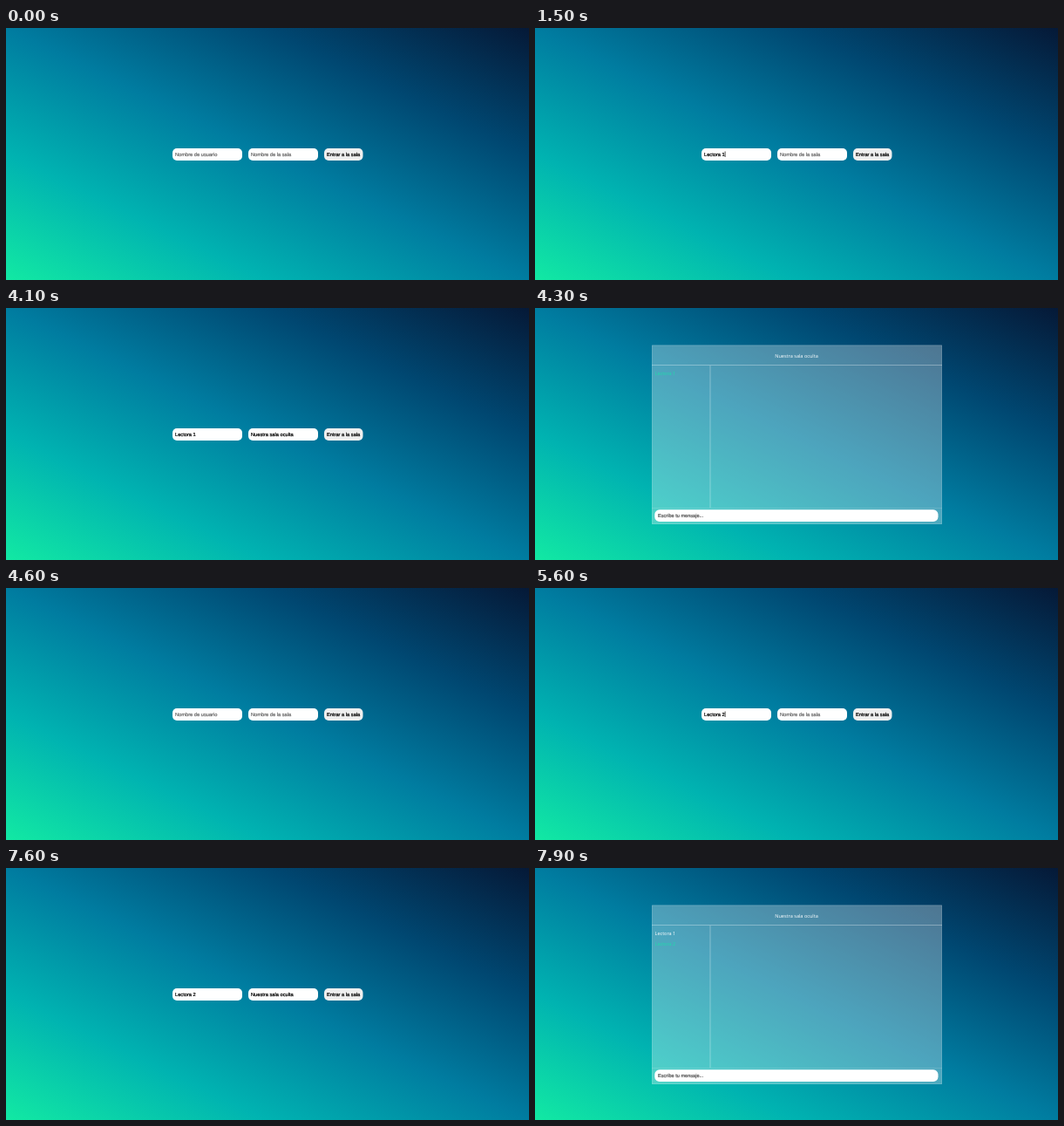
These frames come from a looping animation (600 px wide and 289 px high, 8000 ms). An HTML page:

```html
<!DOCTYPE html>
<html lang="es">
<head>
<meta charset="utf-8">
<title>Sala de chat</title>
<style>
  html, body { margin: 0; height: 100%; overflow: hidden; }
  body { background: linear-gradient(to left bottom, #051937, #004771, #007ca0, #00b3b1, #12e9a3); }
  svg { display: block; width: 100vw; height: 100vh; }
  text { white-space: pre; text-rendering: geometricPrecision; }
  #form text, #chat #message { font: 5.7px "Liberation Sans", Arial, sans-serif; stroke: currentColor; stroke-width: .22px; fill: currentColor; }
  #chat text { font: 5.55px "Open Sans", sans-serif; fill: #fff; }
  #chat #message { font-size: 5.6px; color: #555; }
  #chat .self { fill: #1fdcab; }
  .line { fill: none; stroke: #fff; stroke-opacity: .32; }
  .faint { stroke-opacity: .12; }
</style>
</head>
<body>
<svg viewBox="0 0 600 289" preserveAspectRatio="none">
  <g id="form">
    <rect x="191" y="138" width="80" height="14" rx="5" fill="#fff"/>
    <rect x="278" y="138" width="80" height="14" rx="5" fill="#fff"/>
    <rect x="365" y="138" width="44.5" height="14" rx="5" fill="#efefef"/>
    <text id="user" x="194" y="147"/>
    <text id="room" x="281" y="147"/>
    <text x="368" y="147">Entrar a la sala</text>
    <rect id="caret" y="141.5" width=".7" height="6.5"/>
  </g>
  <g id="chat">
    <rect x="134" y="42.5" width="333" height="205.5" fill="#fff" fill-opacity=".3"/>
    <path class="line" d="M134 65.5H467M201 66V229"/>
    <path class="line faint" d="M134.5 43H466.5V247.5H134.5ZM134 229.5H467"/>
    <rect x="137.3" y="231.3" width="325.2" height="13.6" rx="5.5" fill="#fff"/>
    <text id="message" x="141" y="240">Escribe tu mensaje...</text>
    <g id="joined">
      <text x="300" y="56.5" text-anchor="middle">Nuestra sala oculta</text>
      <text id="first" x="137.5" y="76.7">Lectora 1</text>
      <text id="second" class="self" x="137.5" y="89.2">Lectora 2</text>
    </g>
  </g>
</svg>
<script>
const LOOP = 8000;
const STEP = 100;
const ROOM = "Nuestra sala oculta";
const el = id => document.getElementById(id);
const show = (id, on) => el(id).style.display = on ? "" : "none";

// All times in ms; typing spans are [first key, last key].
const visits = [
  { name: "Lectora 1", start: 0, focusUser: 300, userTyping: [600, 1200],
    focusRoom: 1800, roomTyping: [2400, 3800], blur: 4000, enter: 4300, joined: 4300 },
  { name: "Lectora 2", start: 4600, focusUser: 4900, userTyping: [5100, 5600],
    focusRoom: 5900, roomTyping: [6100, 7300], blur: 7600, enter: 7800, joined: 7900 }
];

// Typing speeds up slightly from the first key to the last.
function typedCount(length, [first, last], t) {
  if (t < first) return 0;
  const progress = Math.min(1, (t - first) / (last - first));
  return 1 + Math.floor((length - 1) * progress ** 1.2);
}

// Fills an input and returns the x where its text ends.
function fillField(id, value, placeholder, typing, t) {
  const field = el(id);
  const count = typedCount(value.length, typing, t);
  field.textContent = count ? value.slice(0, count) : placeholder;
  field.style.color = count ? "#000" : "#6b6b6b";
  return +field.getAttribute("x") + (count ? field.getComputedTextLength() : 0);
}

function drawForm(visit, t) {
  const userEnd = fillField("user", visit.name, "Nombre de usuario", visit.userTyping, t);
  const roomEnd = fillField("room", ROOM, "Nombre de la sala", visit.roomTyping, t);
  el("caret").setAttribute("x", t < visit.focusRoom ? userEnd : roomEnd);
  show("caret", t >= visit.focusUser && t < visit.blur);
}

function drawChat(visit, t) {
  const isSecond = visit === visits[1];
  show("joined", t >= visit.joined);
  show("second", isSecond);
  el("first").classList.toggle("self", !isSecond);
}

function draw(elapsed) {
  const t = Math.floor(elapsed % LOOP / STEP) * STEP;
  const visit = visits[t < visits[1].start ? 0 : 1];
  const inChat = t >= visit.enter;
  show("form", !inChat);
  show("chat", inChat);
  if (inChat) drawChat(visit, t);
  else drawForm(visit, t);
}

const started = performance.now();
function tick() {
  draw(performance.now() - started);
  requestAnimationFrame(tick);
}
tick();
</script>
</body>
</html>
```
